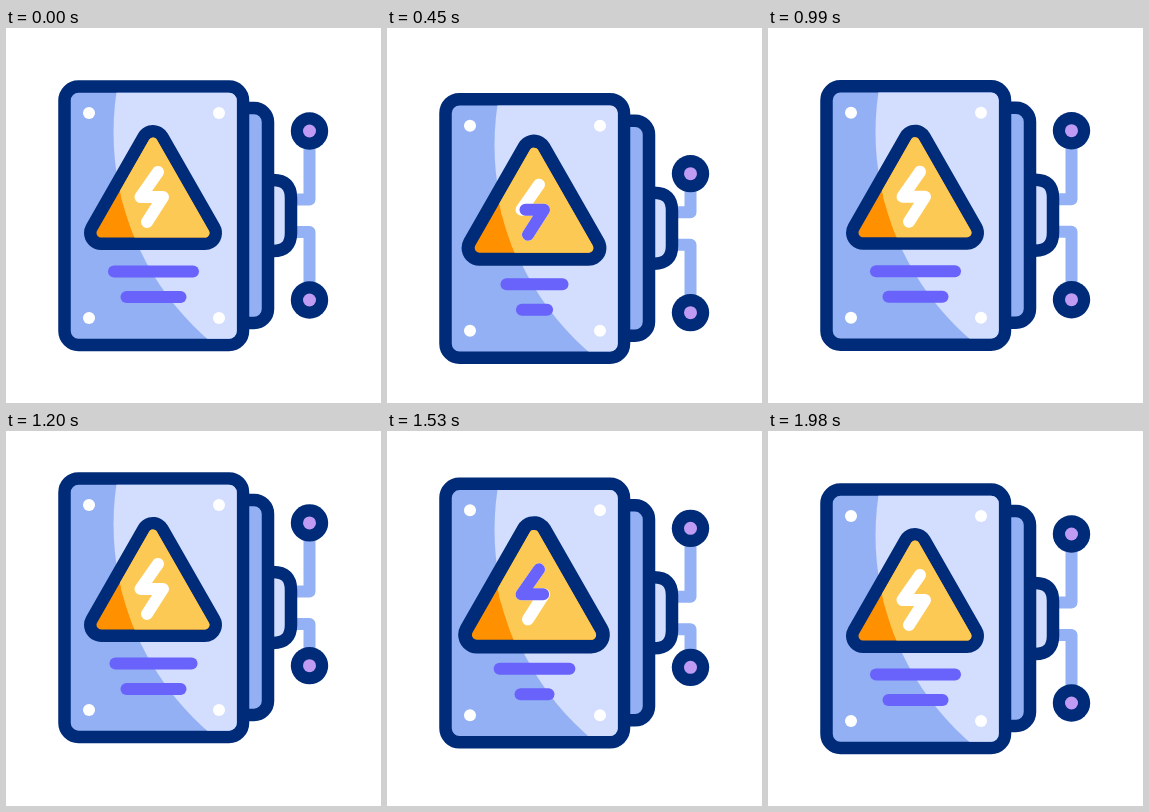
Write an HTML page that moves like this. It is 375 by 375 pixels and loops after 2.25 s.

```html
<!DOCTYPE html>
<html lang="en">
<head>
<meta charset="utf-8">
<title>Electrical panel</title>
<style>
html, body { margin: 0; width: 100%; height: 100%; overflow: hidden; background: #fff; }
svg { display: block; width: 100vw; height: 100vh; }
.ink { stroke: #002b78; stroke-width: 12.5; }
.round { fill: none; stroke-linecap: round; stroke-linejoin: round; stroke-width: 12; }
.wire { stroke: #93b1f4; }
.line { stroke: #6a63fb; }
.blue { fill: #92b0f3; }
.pale { fill: #d3ddfd; }
.sign { stroke-linejoin: round; }
</style>
</head>
<body>
<svg viewBox="0 0 375 375">
  <defs>
    <clipPath id="lit"><circle cx="381.5" cy="104.5" r="274"/></clipPath>
    <path id="tri" d="M147 114L199 205H95Z"/>
    <path id="bolt" d="M152 144L134.500 169H157L141 194"/>
    <g id="node"><circle cx="303.5" r="18.7" fill="#002b78"/><circle cx="303.5" r="6.5" fill="#bf9bf3"/></g>
  </defs>
  <g id="all">
    <path id="wireA" class="round wire"/>
    <path id="wireB" class="round wire"/>
    <use id="nodeA" href="#node"/>
    <use id="nodeB" href="#node"/>
    <path class="ink pale" d="M255 152H267Q285 152 285 170V205Q285 223 267 223H255Z"/>
    <rect class="ink blue" x="200" y="80" width="62" height="215" rx="14"/>
    <rect class="ink blue" x="58.5" y="58.5" width="178.5" height="258.5" rx="14"/>
    <rect class="pale" x="64.75" y="64.75" width="166" height="246" rx="7.75" clip-path="url(#lit)"/>
    <g fill="#fff">
      <circle cx="83" cy="85" r="6"/><circle cx="213" cy="85" r="6"/>
      <circle cx="83" cy="290" r="6"/><circle cx="213" cy="290" r="6"/>
    </g>
    <g id="sign" class="sign">
      <use href="#tri" fill="#002b78" stroke="#002b78" stroke-width="34"/>
      <use href="#tri" fill="#ff9100" stroke="#ff9100" stroke-width="9"/>
      <g clip-path="url(#lit)"><use href="#tri" fill="#fdc955" stroke="#fdc955" stroke-width="9"/></g>
    </g>
    <use href="#bolt" class="round" stroke="#fff"/>
    <path id="spark" class="round line" pathLength="100" d="M152 144L134.500 169H157L141 194"/>
    <path id="lineA" class="round line"/>
    <path id="lineB" class="round line"/>
  </g>
</svg>
<script>
const LOOP = 2250, STEP = 30, HALF = 960;
const $ = id => document.getElementById(id);
const set = (id, name, value) => $(id).setAttribute(name, value);

// Eased interpolation through [time, value] pairs.
function track(keys, t) {
  if (t <= keys[0][0]) return keys[0][1];
  for (let i = 1; i < keys.length; i++) {
    const [a, from] = keys[i - 1], [b, to] = keys[i];
    if (t < b) {
      const x = (t - a) / (b - a);
      return from + (to - from) * x * x * (3 - 2 * x);
    }
  }
  return keys[keys.length - 1][1];
}

const SWAY = [[0, 0], [360, 15], [720, 0]];
const DROP = [[0, 0], [270, 30], [630, 30], [900, 0]];
const RISE = [[30, 0], [300, -30], [630, -30], [900, 0]];
const SWELL = [[315, 1], [585, 1.1], [855, 1]];
const LONG = [[180, 79], [450, 56], [720, 89], [990, 79]];
const SHORT = [[240, 54], [510, 21], [780, 76], [1020, 54]];
const HEAD = [[300, 100], [570, 0]];
const TAIL = [[465, 100], [720, 0]];

function bar(id, y, length) {
  set(id, "d", `M${147.5 - length / 2} ${y}h${length}`);
}

function link(name, y, end) {
  set("wire" + name, "d", `M280 ${y}H303.500V${end}`);
  set("node" + name, "transform", `translate(0 ${end})`);
}

function draw(t) {
  const second = t >= HALF;
  const u = second ? t - HALF : t;
  set("all", "transform", `translate(0 ${track(SWAY, u) * (second ? -1 : 1)})`);
  link("A", 171.5, 103 + (second ? 0 : track(DROP, u)));
  link("B", 204, 272 + (second ? track(RISE, u) : 0));
  const k = track(SWELL, u);
  set("sign", "transform", `translate(147 159.500) scale(${k}) translate(-147 -159.500)`);
  bar("lineA", 243.5, track(LONG, u));
  bar("lineB", 269, track(SHORT, u));
  const head = track(HEAD, u), length = track(TAIL, u) - head;
  set("spark", "stroke-dasharray", `${length} 200`);
  set("spark", "stroke-dashoffset", -head);
  set("spark", "visibility", length > 0.5 ? "visible" : "hidden");
}

const start = performance.now();
function tick() {
  const t = (performance.now() - start) % LOOP;
  draw(Math.floor(t / STEP) * STEP);
  requestAnimationFrame(tick);
}
tick();
</script>
</body>
</html>
```
